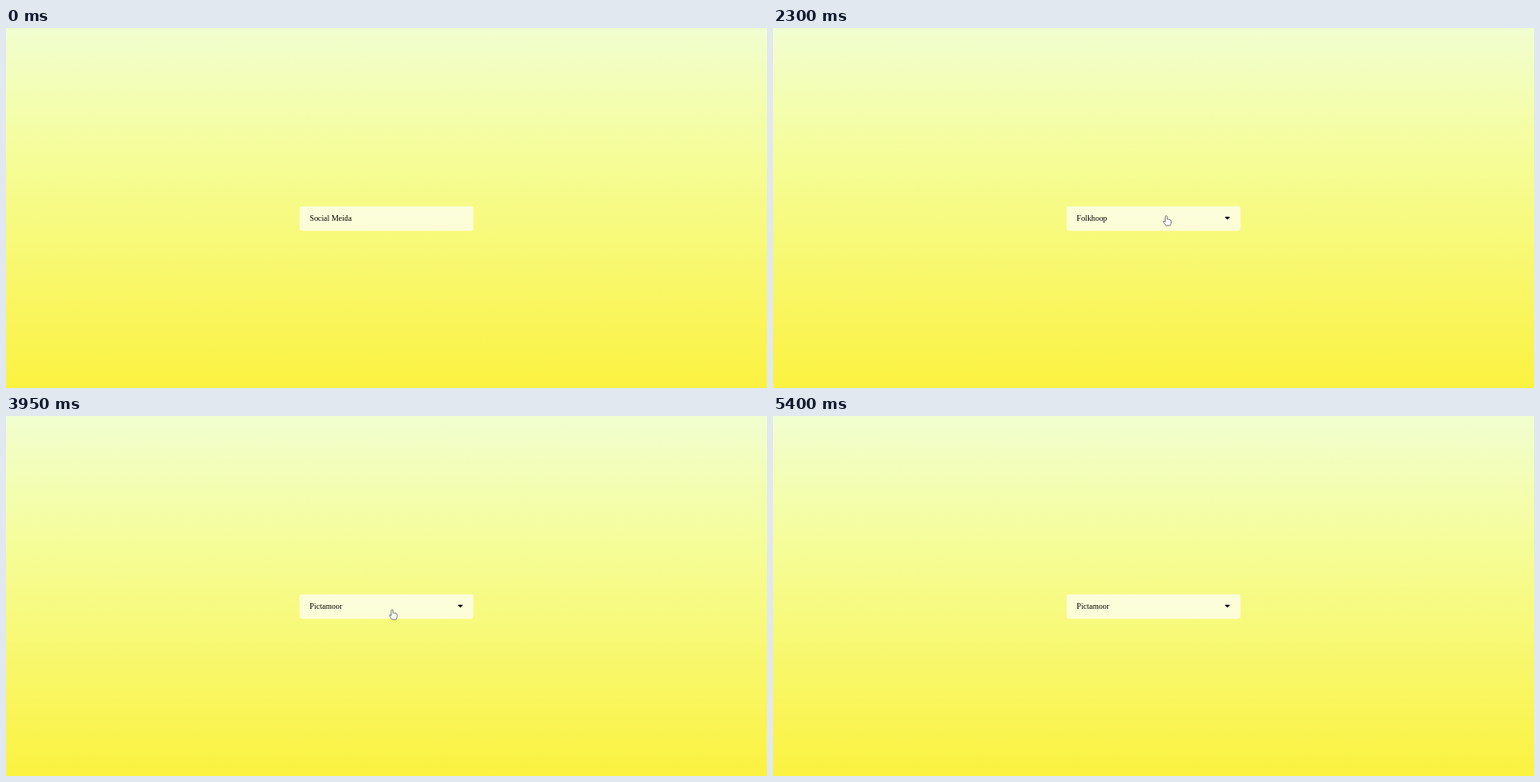
An HTML page that plays this animation: 800x379 px, repeating every 5450 ms.

```html
<!DOCTYPE html>
<html lang="en">
<head>
<meta charset="utf-8">
<title>Dropdown</title>
<style>
  html, body { margin: 0; width: 100%; height: 100%; overflow: hidden; }
  svg { display: block; width: 800px; height: 379px; font: 8.33px "Liberation Serif", "Times New Roman", serif;
    background: linear-gradient(#f1fed0, #f5fd98 36%, #fbf240); }
  .glass { fill: #fff; fill-opacity: .7; }
  .cursor { fill: #fff; stroke: #555; stroke-width: .7; stroke-linejoin: round; }
</style>
</head>
<body>
<svg viewBox="0 0 800 379">
  <rect class="glass" x="308.6" y="187.7" width="182.8" height="25.7" rx="2.4"/>
  <text id="label" x="319.3" y="203.3"></text>
  <path id="caret" d="M475.6 198.7h4q.8 0 .4.6l-1.9 2q-.5.4-1 0l-1.9-2q-.4-.6.4-.6z"/>
  <g id="panel">
    <rect class="glass" x="308.6" y="228.6" width="182.8" height="210" rx="2.4"/>
    <rect id="hover" class="glass" x="308.6" width="182.8" height="25.15"/>
  </g>
  <path id="arrow" class="cursor" d="M0 0V8L1.8 6.4 3 9 4.1 8.5 3 6H5.4z"/>
  <path id="hand" class="cursor" d="M-1 1.3Q0 .1 1 1.3V4.4Q2 3.6 2.6 4.5 3.5 4.1 4 5 5.2 4.8 5.2 6.2V8Q5 9.5 4.2 11H-.3Q-1.4 9.2-2.8 7.5-3.3 6.2-2.2 6.1L-1 7.2z"/>
</svg>
<script>
const LOOP = 5450, STEP = 50, TOP = 229, ROW = 25.15, HEAD = 195;
const [label, caret, panel, hover, arrow, hand] =
  ["label", "caret", "panel", "hover", "arrow", "hand"].map(id => document.getElementById(id));
const items = ["Folkhoop", "Wordrelay", "Murmfold", "Clipden", "Pictamoor", "Twinely"];

const rowY = row => TOP + (row + .5) * ROW;
const rowAt = y => Math.floor((y - TOP) / ROW);

// The pointer glides between stops and clicks as it leaves each one.
const stop = (x, y, arrive, leave = arrive) => ({ x, y, arrive, leave });
const stops = [
  stop(54, 0, 50),
  stop(452, HEAD, 1350),
  stop(420, rowY(0), 1950),
  stop(413, HEAD, 2350),
  stop(379, rowY(2), 2700),
  stop(395, HEAD, 3100),
  stop(406, rowY(4), 3650),
  stop(406, HEAD, 4000),
  stop(407, rowY(4.2), 4600, 4850),
  stop(339, -12, 5400)
];

function add(tag, attrs, text = "") {
  const el = document.createElementNS("http://www.w3.org/2000/svg", tag);
  for (const key in attrs) el.setAttribute(key, attrs[key]);
  el.textContent = text;
  panel.append(el);
}

items.forEach((name, i) => {
  const y = rowY(i);
  add("circle", { cx: 328.3, cy: y, r: 6.5 });
  add("text", { x: 345.3, y: y + 2.6 }, name);
});

const ease = k => k * k * (3 - 2 * k);

function pointer(t) {
  const i = stops.findIndex(s => s.arrive > t);
  if (i < 1) return null;
  const a = stops[i - 1], b = stops[i];
  const k = ease(Math.max(0, (t - a.leave) / (b.arrive - a.leave)));
  return { x: a.x + (b.x - a.x) * k, y: a.y + (b.y - a.y) * k };
}

function menu(t) {
  let open = false, text = "Social Meida";
  for (const s of stops.slice(1, -1)) {
    if (s.leave > t) break;
    if (open) text = items[rowAt(s.y)];
    open = !open;
  }
  return { open, text };
}

function show(el, on) { el.style.display = on ? "" : "none"; }

function draw(t) {
  const { open, text } = menu(t);
  const tip = pointer(t), { x, y } = tip || { x: 0, y: 0 };
  const inside = x >= 309 && x <= 491;
  const onRow = inside && open && y >= TOP;
  const active = onRow || inside && y >= 188 && y <= 213;
  label.textContent = text;
  show(caret, t >= STEP);
  show(panel, open);
  show(hover, onRow);
  hover.setAttribute("y", TOP + rowAt(y) * ROW);
  show(hand, tip && active);
  show(arrow, tip && !active);
  for (const el of [hand, arrow]) el.setAttribute("transform", `translate(${x} ${y})`);
}

const start = performance.now();
function tick() {
  const t = Math.max(0, performance.now() - start) % LOOP;
  draw(Math.floor(t / STEP) * STEP);
  requestAnimationFrame(tick);
}
tick();
</script>
</body>
</html>
```
